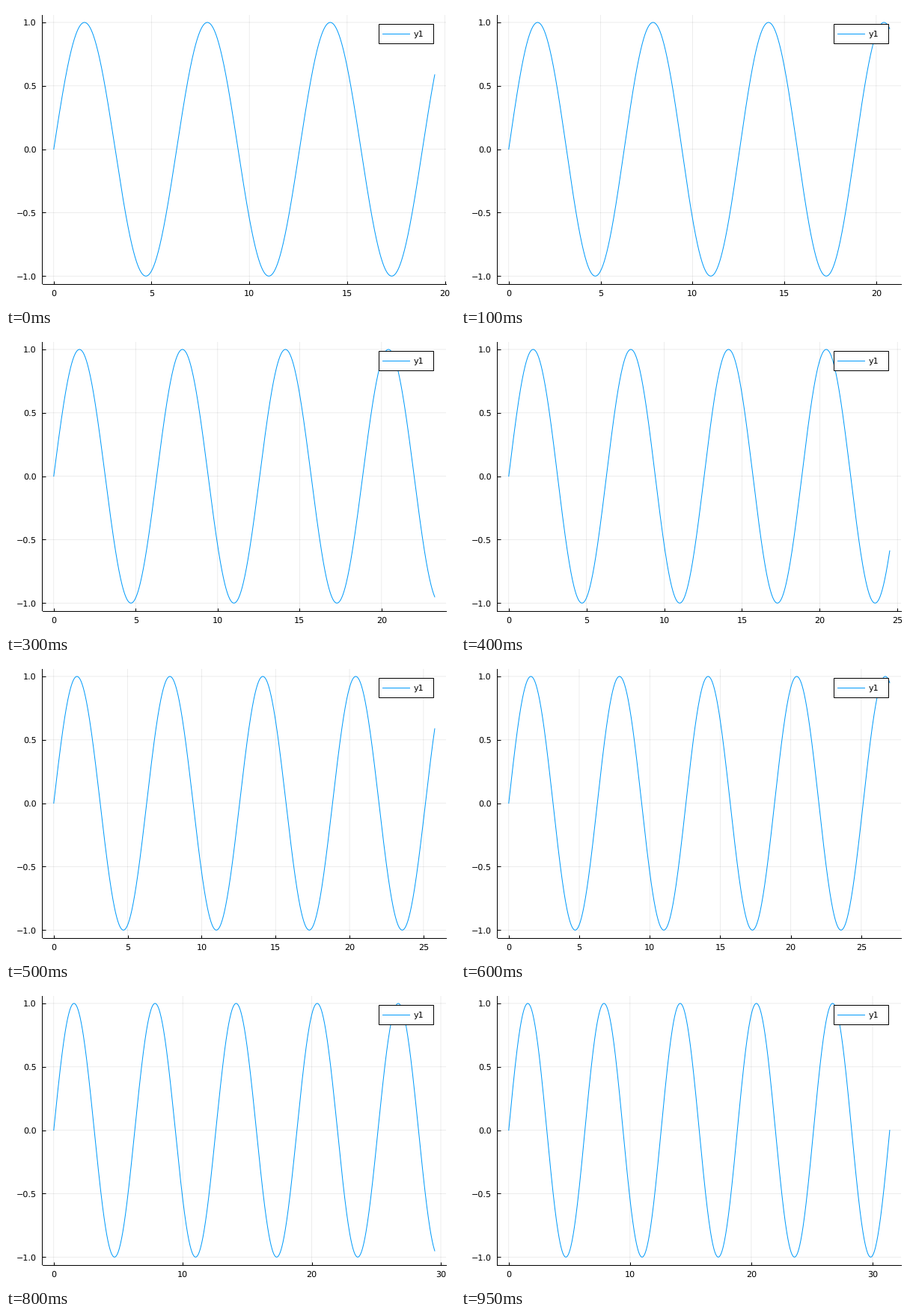
These frames come from a looping animation (600x400 px, 1 s). A matplotlib script:

```python
import matplotlib.pyplot as plt
import numpy as np
from matplotlib.animation import FuncAnimation
from matplotlib.lines import Line2D
from matplotlib.patches import Rectangle
from matplotlib.transforms import IdentityTransform

W, H, DPI = 600, 400, 100
FRAMES, INTERVAL = 20, 50
PX = 72 / DPI  # one pixel in points
BLUE = "#009AFA"
LEFT, RIGHT, TOP, BOTTOM = 48.5, 588.2, 11.8, 371.5
MARGIN = 0.03

plt.rcParams.update({
    "font.family": "DejaVu Sans",
    "font.size": 8,
    "text.hinting": "none",
    "axes.linewidth": PX,
    "axes.unicode_minus": True,
})

fig = plt.figure(figsize=(W / DPI, H / DPI), dpi=DPI, facecolor="white")
ax = fig.add_axes([LEFT / W, 1 - BOTTOM / H,
                   (RIGHT - LEFT) / W, (BOTTOM - TOP) / H])
ax.spines[["top", "right"]].set_visible(False)
ax.set_axisbelow(True)
ax.grid(color="black", alpha=0.1, linewidth=0.7 * PX)
ax.tick_params(direction="in", length=4.5 * PX, width=PX)
ax.tick_params(axis="x", pad=7.5 * PX)
ax.tick_params(axis="y", pad=8 * PX)
ax.set_ylim(-1 - 2 * MARGIN, 1 + 2 * MARGIN)
ax.set_yticks(np.linspace(-1, 1, 5))
ax.yaxis.set_major_formatter(
    lambda v, _: f"{v:.1f}".replace("-", "\u2212"))
curve, = ax.plot([], [], color=BLUE, linewidth=PX)


def add_legend():
    pixels = IdentityTransform()
    fig.add_artist(Rectangle((497.5, H - 49.5), 73, 26, facecolor="white",
                             edgecolor="black", linewidth=PX,
                             transform=pixels, zorder=5))
    fig.add_artist(Line2D([503, 539], [H - 36.5] * 2, color=BLUE,
                          linewidth=PX, transform=pixels, zorder=6))
    fig.text(544.6, H - 41, "y1", va="baseline",
             transform=pixels, zorder=6)


def update(i):
    end = (6.2 + 0.2 * i) * np.pi
    x = np.linspace(0, end, 1000)
    curve.set_data(x, np.sin(x))
    x_max = end * (1 + MARGIN)
    step = 5 if x_max < 30 else 10
    ax.set_xticks(np.arange(0, x_max, step))
    ax.set_xlim(-end * MARGIN, x_max)
    for line in ax.get_xgridlines() + ax.get_ygridlines():
        line.set_snap(False)
    return curve,


add_legend()
anim = FuncAnimation(fig, update, frames=FRAMES, interval=INTERVAL,
                     repeat=True, repeat_delay=0, blit=False)
plt.show()
```
